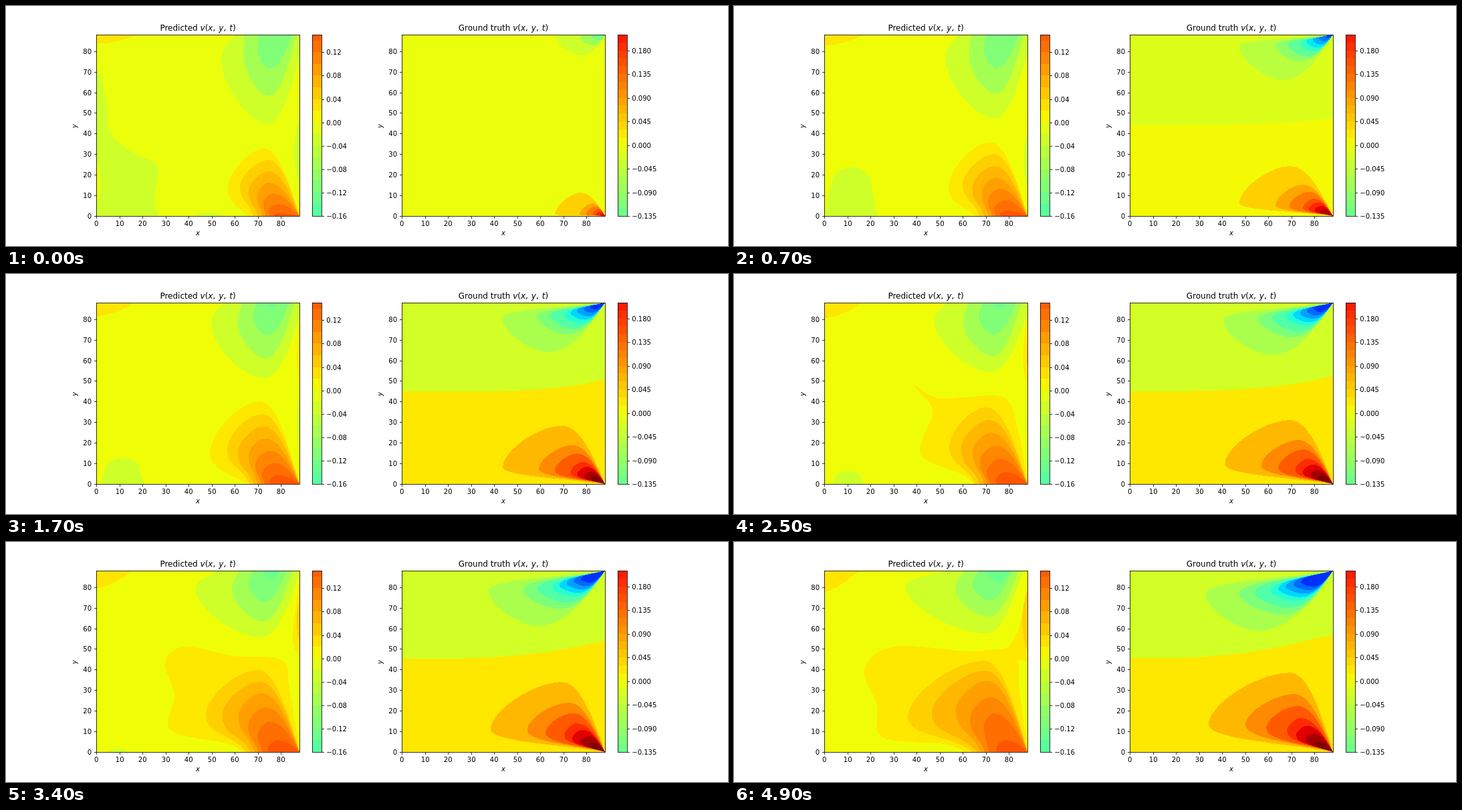
These frames come from a looping animation (1080x360 px, 5 s). An HTML page:

```html
<!DOCTYPE html>
<html lang="en">
<head>
<meta charset="utf-8">
<style>
html, body { margin: 0; width: 100%; height: 100%; overflow: hidden; background: #fff; }
svg { display: block; }
text { font: 10px "DejaVu Sans", sans-serif; }
.title { font-size: 12px; }
.title tspan, .axis { font-style: italic; }
.line { fill: none; stroke: #000; stroke-width: .8; }
</style>
</head>
<body>
<svg id="stage" width="1080" height="360" viewBox="0 0 1080 360"></svg>
<script>
const TOP = 43, BASE = 315, W = 304, H = BASE - TOP;
const LEFT = 135, RIGHT = 592, LEFT_END = LEFT + W, RIGHT_END = RIGHT + W;

// Jet colour map, p in 0..1
function jet(p) {
  const ramp = (a, b, c, d, lo = 0, hi = 0) =>
    p < b ? lo + (1 - lo) * Math.max(0, (p - a) / (b - a)) :
    p < c ? 1 : hi + (1 - hi) * Math.max(0, (d - p) / (d - c));
  return `rgb(${[ramp(.35, .66, .89, 1, 0, .5), ramp(.125, .375, .64, .91), ramp(0, .11, .34, .65, .5)]
    .map(v => Math.round(v * 255))})`;
}

const fill = (p, d) => `<path fill="${jet(p)}" d="${d}"/>`;
const lerp = (a, b, u) => Array.isArray(a) ? a.map((v, i) => lerp(v, b[i], u)) : a + (b - a) * u;

// Value at time t of a track [[time, pose], ...]; ease bends the first segment
function at(track, t, ease = 1) {
  let i = 0;
  while (i < track.length - 2 && t >= track[i + 1][0]) i++;
  const [t0, a] = track[i], [t1, b] = track[i + 1];
  const u = Math.min(1, Math.max(0, (t - t0) / (t1 - t0)));
  return lerp(a, b, i ? u : u ** ease);
}

// Fill in the contour levels between the given anchor levels
function levels(nodes, anchors) {
  const out = [];
  for (let n = 0; n <= nodes.at(-1); n++) out.push(at(nodes.map((k, i) => [k, anchors[i]]), n));
  return out;
}

// Contour from corner k over extreme t and side tip l, back to the edge at b
function blob(kx, ky, tx, ty, lx, ly, bx, by, sag = .3) {
  const dx = kx - tx, dy = ky - ty, ex = bx - lx, ey = by - ly;
  return `M${kx} ${ky}C${kx - .26 * dx} ${ky - .45 * dy} ${tx + .43 * dx} ${ty} ${tx} ${ty}` +
    `C${tx - .4 * (tx - lx)} ${ty} ${lx} ${ly + .4 * (ty - ly)} ${lx} ${ly}` +
    `C${lx} ${ly + .55 * ey} ${bx - .33 * ex} ${by - sag * ey} ${bx} ${by}L${kx} ${by}Z`;
}

// Smooth curve through x, y pairs, closed by a straight line
function spline(xy) {
  const n = xy.length / 2;
  const p = (i, k) => xy[2 * Math.min(n - 1, Math.max(0, i)) + k];
  let d = `M${p(0, 0)} ${p(0, 1)}`;
  for (let i = 0; i < n - 1; i++) {
    const c = k => p(i, k) + (p(i + 1, k) - p(i - 1, k)) / 6;
    const e = k => p(i + 1, k) - (p(i + 2, k) - p(i, k)) / 6;
    d += `C${c(0)} ${c(1)} ${e(0)} ${e(1)} ${p(i + 1, 0)} ${p(i + 1, 1)}`;
  }
  return d + 'Z';
}

const sideLens = (x, depth, a, b) => `M${x} ${a}Q${x - 2 * depth} ${(a + b) / 2} ${x} ${b}Z`;

// Predicted field, warm corner: tx, ty, lx, ly, bx
const warmNodes = [0, 2, 4, 5];
const warm = [
  [0, [[393, 231, 350, 270, 370], [393, 265, 376, 285, 383], [407, 297, 393, 308, 394], [410, 311, 400, 314, 400]]],
  [2.5, [[378, 200, 322, 258, 361], [385, 238, 357, 265, 374], [398, 277, 378, 297, 384], [406, 297, 391, 310, 393]]],
  [4.9, [[375, 178, 260, 263, 357], [378, 208, 332, 252, 369], [388, 257, 374, 277, 381], [406, 297, 392, 310, 394]]]
];
const halo = [[0, [386, 214, 332, 274, 361]], [1.7, [380, 191, 305, 269, 359]], [2.5, [379, 181, 283, 268, 358]]];
const wideHalo = [
  [2.5, [439, 313, 425, 235, 405, 186, 345, 185, 303, 186, 268, 167, 297, 205, 279, 270, 340, 300, 358, 315]],
  [3.4, [439, 313, 424, 220, 412, 177, 340, 171, 268, 157, 238, 180, 252, 230, 246, 282, 330, 302, 354, 315]],
  [4.9, [439, 313, 427, 225, 418, 165, 350, 164, 240, 157, 195, 190, 214, 245, 222, 293, 315, 303, 345, 315]]
];
// Cool corner: kx, ky, tx, ty, lx, ly, bx
const coolRim = [[0, [439, 75, 392, 177, 322, 80, 343]], [2.5, [439, 60, 385, 147, 300, 72, 318]],
  [4.9, [433, 43, 378, 137, 256, 67, 315]]];
const cool = [
  [0, [[435, 43, 393, 135, 355, 75, 357], [428, 43, 395, 94, 377, 68, 378], [402, 43, 400, 43, 398, 43, 398]]],
  [4.9, [[426, 43, 382, 112, 331, 72, 345], [416, 43, 383, 88, 357, 64, 366], [411, 43, 396, 61, 379, 45, 379]]]
];
const coolTones = [.6, .55, .505, .48];
const patch = [
  [0, [134, 315, 134, 105, 150, 140, 156, 190, 190, 220, 222, 235, 228, 250, 222, 285, 227, 315]],
  [.7, [137, 315, 138, 303, 142, 280, 150, 255, 165, 244, 186, 243, 203, 258, 208, 285, 215, 315]]
];
// Left end, right end and height of the shrinking patch
const patchSize = [[.7, [137, 215, 72]], [1.7, [143, 207, 38]], [2.5, [148, 194, 19]], [3.4, [155, 182, 4]], [3.8, [165, 170, 0]]];
// Upper end, tip x, tip y, lower end
const strip = [[.7, [100, 439, 110, 120]], [1.7, [70, 435, 130, 155]], [2.5, [65, 432, 130, 166]],
  [3.4, [62, 429, 145, 173]], [4.2, [62, 400, 166, 178]], [4.9, [55, 398, 164, 179]]];
const sliver = [[0, [9, 172, 265]], [.7, [6, 190, 270]], [1.7, [3, 180, 255]], [3.2, [0, 200, 240]]];
const edge = [[2, [0, 110, 130]], [3.4, [4, 88, 152]], [4.9, [8, 73, 164]]];

function patchPoints(t) {
  const [a, b, h] = at(patchSize, t);
  return at(patch, t).map((v, i) => t < .7 ? v :
    i % 2 ? BASE - (BASE - v) * h / 72 : a + (v - 137) * (b - a) / 78);
}

function predicted(t) {
  const [a, b, y, c] = at(strip, t), d = LEFT_END - b, h = y - a, u = t / 4.9;
  const cy = lerp(57, 75, u), start = t < .3;
  return fill(start ? .6357 : .641, `M${LEFT} ${TOP}h${W}v${H}h-${W}Z`) +
    fill(.667, `M${LEFT} ${TOP}V${cy}Q${lerp(170, 152, u)} ${cy - 2} ${lerp(196, 187, u)} ${TOP}Z`) +
    fill(.6, spline(patchPoints(t))) +
    (start ? fill(.6357, sideLens(LEFT, -7, 230, 300)) + fill(.6, 'M280 315Q308 305 326 315Z') : '') +
    fill(.664, t < 2.4 ? blob(LEFT_END, BASE, ...at(halo, t), BASE) : spline(at(wideHalo, t))) +
    levels(warmNodes, at(warm, t))
      .map((p, i) => fill(.69 + .026 * i, blob(LEFT_END, BASE, ...p, BASE, .5))).join('') +
    [at(coolRim, t), ...at(cool, t)].map((p, i) => fill(coolTones[i], blob(...p, TOP))).join('') +
    fill(.6, sideLens(LEFT_END, ...at(sliver, t))) +
    fill(.664, `M439 ${a}C${439 - .8 * Math.min(d, 9)} ${a + .5 * h} ${439 - Math.min(d, 11)} ${a + .9 * h} ${b} ${y}` +
      `C${b} ${(y + c) / 2} 439 ${c} 439 ${c}Z`) +
    fill(.69, sideLens(LEFT_END, ...at(edge, t)));
}

// Reference field: tx, ty, lx, ly
const hotNodes = [0, 1, 3, 6], coldNodes = [0, 1, 3, 7];
const hot = [
  [0, [[860, 280, 821, 313], [878, 296, 858, 313], [887, 305, 877, 313], [895, 314, 894, 314]]],
  [.7, [[832, 240, 756, 296], [851, 268, 810, 299], [868, 289, 851, 303], [884, 305, 877, 308]]],
  [4.9, [[832, 196, 710, 274], [838, 228, 765, 274], [848, 264, 827, 284], [876, 299, 868, 302]]]
];
const cold = [
  [0, [[862, 74, 822, 45], [880, 60, 858, 45], [894, 44, 893, 44], [894, 44, 893, 44]]],
  [.7, [[822, 111, 756, 60], [848, 83, 810, 58], [867, 68, 847, 56], [888, 48, 884, 46]]],
  [4.9, [[785, 133, 705, 78], [823, 109, 755, 78], [842, 88, 803, 74], [866, 67, 848, 60]]]
];
const divide = [[.7, [179, 176, 168]], [1.7, [176, 172, 157]], [4.9, [174, 146, 140]]];

function truth(t) {
  const mode = t < .3 ? 0 : t < 1.2 ? 1 : 2;
  const [y0, y1, y2] = at(divide, t);
  const base = [.6357, .645, .664][mode], upper = [.6357, .618, .605][mode];
  const warmest = mode < 2 ? .69 : .715, step = mode < 2 ? .045 : .05;
  const coolest = [.6, .575, .557][mode];
  // Growth slows down over time
  const s = t < .7 ? t : .7 + 4.2 * ((t - .7) / 4.2) ** .88;
  const plumes = (nodes, track, y, p0, dp) => levels(nodes, at(track, s, .6))
    .map((p, i) => fill(Math.min(1, p0 + dp * i), blob(RIGHT_END, y, ...p, RIGHT_END, y))).join('');
  return fill(base, `M${RIGHT} ${TOP}h${W}v${H}h-${W}Z`) +
    fill(upper, `M${RIGHT} ${TOP}V${y0}C790 178 845 ${y1} ${RIGHT_END} ${y2}V${TOP}Z`) +
    plumes(hotNodes, hot, BASE, warmest, step) +
    plumes(coldNodes, cold, TOP, coolest, -.055);
}

const label = (x, y, s, anchor = 'middle', extra = '') =>
  `<text x="${x}" y="${y}" text-anchor="${anchor}" ${extra}>${s}</text>`;
const frame = (x, w) => `<rect class="line" x="${x + .5}" y="${TOP + .5}" width="${w}" height="${H}"/>`;

function axes(x, name, id) {
  let s = `<svg id="${id}" x="${x}" y="${TOP}" width="${W}" height="${H}" viewBox="${x} ${TOP} ${W} ${H}" shape-rendering="crispEdges"></svg>`;
  s += frame(x, W);
  for (let v = 0; v < 90; v += 10) {
    const px = Math.round(x + v * W / 88) + .5, py = Math.round(BASE - v * H / 88) + .5;
    s += `<path class="line" d="M${px} ${BASE + .5}v3.5M${x + .5} ${py}h-3.5"/>` +
      label(px - .3, 330, v) + label(x - 7, py + 3.5, v, 'end');
  }
  const mid = x + W / 2;
  return s + label(mid, 344, 'x', 'middle', 'class="axis"') +
    label(0, 0, 'y', 'middle', `class="axis" transform="translate(${x - 29} 180) rotate(-90)"`) +
    label(mid, 37, `${name} <tspan>v</tspan>(<tspan>x</tspan>,<tspan dx="5">y</tspan>,<tspan dx="5">t</tspan>)`,
      'middle', 'class="title"');
}

function colorbar(x, lo, hi, step, tick, digits) {
  const y = v => BASE - (v - lo) / (hi - lo) * H;
  let s = '<g shape-rendering="crispEdges">';
  for (let v = lo; v < hi - 1e-6; v += step) {
    const end = Math.min(hi, v + step);
    s += `<rect x="${x}" y="${y(end)}" width="14" height="${y(v) - y(end)}" fill="${jet(.637 + 1.2 * (v + end) / 2)}"/>`;
  }
  s += '</g>' + frame(x, 14);
  for (let v = lo; v < hi - 1e-6; v += tick) {
    const py = Math.round(y(v)) + .5;
    s += `<path class="line" d="M${x + 14.5} ${py}h3.5"/>` +
      label(x + 21.3, py + 3.5, (v < -1e-6 ? '−' : '') + Math.abs(v).toFixed(digits), 'start');
  }
  return s;
}

const $ = id => document.getElementById(id);
$('stage').innerHTML = axes(LEFT, 'Predicted', 'left') + axes(RIGHT, 'Ground truth', 'right') +
  colorbar(458, -.16, .15, .02, .04, 2) + colorbar(915, -.135, .21, .015, .045, 3);

let shown = -1;
function draw() {
  const n = Math.floor(performance.now() % 5000 / 100);
  if (n !== shown) {
    shown = n;
    $('left').innerHTML = predicted(n / 10);
    $('right').innerHTML = truth(n / 10);
  }
  requestAnimationFrame(draw);
}
draw();
</script>
</body>
</html>
```
